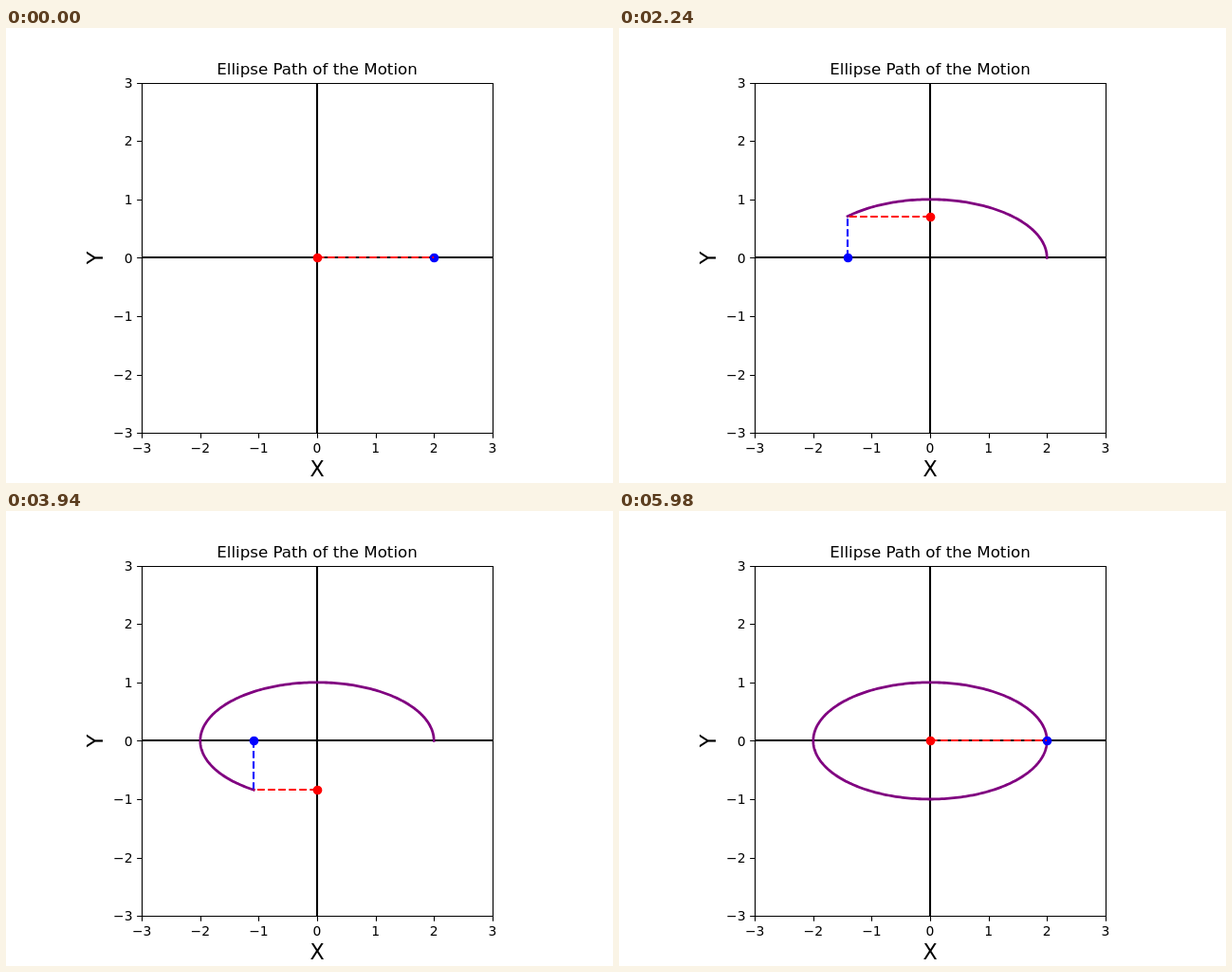
Write an HTML page that moves like this. It is 640 px wide and 480 px high and loops after 6 s.

```html
<!DOCTYPE html>
<html lang="en">
<head>
<meta charset="utf-8">
<title>Ellipse Path of the Motion</title>
<style>
  html, body { margin: 0; width: 100%; height: 100%; overflow: hidden; background: #fff; }
  svg { display: block; width: 640px; height: 480px; }
  text { font-family: "DejaVu Sans", sans-serif; font-size: 13.89px; text-anchor: middle; }
  .title { font-size: 16.67px; }
  .name { font-size: 22.22px; }
  .ytick { text-anchor: end; }
  path { fill: none; stroke: #000; stroke-width: 1.11; }
  .axes { stroke-width: 2.08; }
  .curve { stroke: purple; stroke-width: 2.78; stroke-linecap: square; stroke-linejoin: round; }
  .guide { stroke-width: 2.08; stroke-dasharray: 7.71 3.33; }
  .red { stroke: #f00; }
  .blue { stroke: #00f; }
  circle.red { fill: #f00; stroke: none; }
  circle.blue { fill: #00f; stroke: none; }
</style>
</head>
<body>
<svg viewBox="0 0 640 480">
  <g id="ticks"></g>
  <path class="axes" d="M143 242H513M328 58V427"/>
  <path class="curve" id="curve"/>
  <path class="guide blue" id="drop"/>
  <circle class="blue" id="dotX" r="4.86"/>
  <path class="guide red" id="reach"/>
  <circle class="red" id="dotY" r="4.86"/>
  <path d="M143.5 58.5H513.5V427.5H143.5Z"/>
  <text class="title" x="328" y="49">Ellipse Path of the Motion</text>
  <text class="name" x="328" y="473">X</text>
  <text class="name" transform="translate(102 242.4) rotate(-90)">Y</text>
</svg>
<script>
  const CX = 328, CY = 242.4, UNIT = 61.6;
  const STEPS = 300, STEP_MS = 20;
  const $ = id => document.getElementById(id);
  const toX = x => CX + UNIT * x;
  const toY = y => CY - UNIT * y;
  const snap = v => Math.floor(v + 0.5);

  function drawTicks() {
    let marks = "", labels = "";
    for (let n = -3; n <= 3; n++) {
      const label = String(n).replace("-", "\u2212");
      const x = snap(toX(n)), y = snap(toY(n));
      marks += `M${x + 0.5} 427.5v5.36M143.5 ${y + 0.5}h-5.36`;
      labels += `<text x="${toX(n)}" y="448">${label}</text>` +
        `<text class="ytick" x="133.5" y="${snap(toY(n) + 5.2)}">${label}</text>`;
    }
    $("ticks").innerHTML = `<path d="${marks}"/>` + labels;
  }

  const points = Array.from({ length: STEPS }, (_, i) => {
    const angle = 2 * Math.PI * i / (STEPS - 1);
    return [toX(2 * Math.cos(angle)), toY(Math.sin(angle))];
  });

  function placeDot(dot, x, y) {
    dot.setAttribute("cx", x + 0.5);
    dot.setAttribute("cy", y + 0.5);
  }

  function draw(step) {
    const [x, y] = points[step].map(snap);
    const ox = snap(CX), oy = snap(CY);
    const trail = points.slice(0, step + 1).map(p => p.map(v => v.toFixed(2)).join(" "));
    $("curve").setAttribute("d", step ? "M" + trail.join("L") : "");
    $("drop").setAttribute("d", `M${x} ${oy}V${y}`);
    $("reach").setAttribute("d", `M${ox} ${y}H${x}`);
    placeDot($("dotX"), x, oy);
    placeDot($("dotY"), ox, y);
  }

  function tick() {
    draw(Math.floor(performance.now() / STEP_MS) % STEPS);
    requestAnimationFrame(tick);
  }

  drawTicks();
  tick();
</script>
</body>
</html>
```
